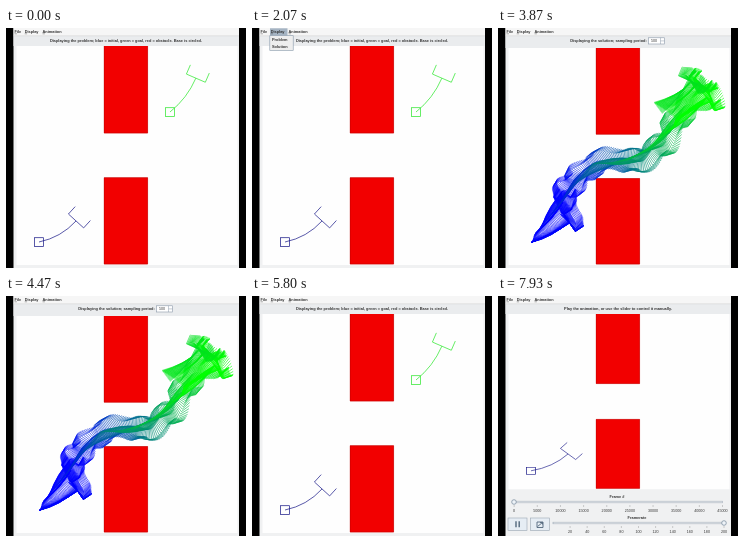
An HTML page that plays this animation: 240x240 px, repeating every 8000 ms.

```html
<!DOCTYPE html>
<html lang="en">
<head>
<meta charset="utf-8">
<title>Motion planner</title>
<style>
html, body { margin: 0; width: 100%; height: 100%; overflow: hidden; background: #000; }
svg { display: block; width: 100%; height: 100%; }
text { font: bold 3.9px "Liberation Sans", Arial, sans-serif; fill: #333; }
.mid { text-anchor: middle; }
.num { font-size: 3.7px; font-weight: normal; }
.robot { fill: none; stroke-width: .75; }
</style>
</head>
<body>
<svg viewBox="0 0 240 240">
  <rect width="240" height="240" fill="#000"/>
  <rect x="7.5" width="225.5" height="240" fill="#f0f1f2"/>
  <rect x="7.5" width="225.5" height="8" fill="#f6f6f6"/>
  <rect x="7.5" y="8" width="225.5" height="10" fill="#eaecee"/>
  <path d="M7.5 7.8H233" stroke="#ccc" stroke-width=".5"/>
  <g id="view"></g>
  <g id="menu"></g>
  <g id="bar"></g>
</svg>
<script>
const LOOP = 8000;
const $ = id => document.getElementById(id);
const rad = deg => deg * Math.PI / 180;
const n = v => v.toFixed(2);
const rect = (x, y, w, h, fill, stroke = 'none') =>
  `<rect x="${x}" y="${y}" width="${w}" height="${h}" fill="${fill}" stroke="${stroke}" stroke-width=".6"/>`;
const text = (x, y, s, cls = '') => `<text x="${x}" y="${y}" class="${cls}">${s}</text>`;
const line = (d, color, w = .6) => `<path d="${d}" fill="none" stroke="${color}" stroke-width="${w}"/>`;

// An arm that bends from its base, ending in a two-pronged gripper.
function arm([x, y, angle, bend]) {
  const at = (px, py, a, r) => [px + r * Math.cos(rad(a)), py + r * Math.sin(rad(a))];
  const head = at(x, y, angle, 42.6), dir = angle + bend / 2;
  const ctrl = at(x, y, angle - bend / 2, 21.3 / Math.cos(rad(bend / 2)));
  const left = at(...head, dir - 90, 10.3), right = at(...head, dir + 90, 10.3);
  const p = q => q.map(n).join(' ');
  return `M${n(x)} ${n(y)}Q${p(ctrl)} ${p(head)}` +
    `M${p(at(...left, dir, 10))}L${p(left)}L${p(right)}L${p(at(...right, dir, 10))}`;
}

const start = [33, 214, -29.6, -36], goal = [164, 84, -52.6, -28];
const route = [
  start, [34, 214, -26, -12], [35, 211, -42, -26], [37, 205, -52, -15], [44, 198, -58, 10],
  [53, 187, -54, 8], [66, 170, -52, 14], [79, 152, -29, 32], [94, 135, -3, 4],
  [112, 134, -13, -20], [130, 131, -29, -20], [147, 121, -44, -18], [163, 109, -50, -8],
  [176, 96, -38, 5], [177, 92, -32, 10], [178, 89, -54, -10], [168, 81, -40, -16],
  [156, 73, -24, -24], goal
];

const robot = (pose, color) => `<g class="robot" stroke="${color}">
  <path d="${arm(pose)}"/><rect x="${pose[0] - 4.4}" y="${pose[1] - 4.3}" width="8.8" height="8.8"/></g>`;

// Poses along the route; the arm sways on its way and comes to rest at both ends.
function sweep() {
  const perLeg = 16, legs = route.length - 1, total = perLeg * legs;
  let out = '';
  for (let i = 0; i <= total; i++) {
    const leg = Math.min(legs - 1, Math.floor(i / perLeg)), f = i / perLeg - leg;
    const [x, y, angle, bend] = route[leg].map((v, k) => v + (route[leg + 1][k] - v) * f);
    const sway = Math.sqrt(Math.max(0, Math.sin(Math.PI * i / total)));
    const pose = [x, y, angle + 4 * sway * Math.sin(i * .29), bend + 30 * sway * Math.sin(i * .21)];
    const g = Math.max(0, Math.min(1, (x + 42 * Math.cos(rad(angle)) - 68) / 140));
    out += line(arm(pose), `rgb(0,${Math.round(255 * g)},${Math.round(255 * (1 - g))})`, .6);
  }
  return out;
}

// The scene is laid out for a field from y = 18 to 237 and scaled to the room left.
const field = (top, scale, content) =>
  `<g transform="translate(0 ${top}) scale(1 ${scale}) translate(0 -18)">` +
  rect(10.5, 18, 221, 219, '#fefefe') + rect(98, 18, 43.8, 87.2, '#f20000') +
  rect(98, 149.5, 43.8, 86.7, '#f20000') +
  line('M98.2 18V105H141.6V18M98.2 236V149.7H141.6V236Z', '#b80000', .5) + content + '</g>';

function slider(x0, x1, y, value, first, step, count, gap) {
  let out = rect(x0, y - .8, x1 - x0, 1.6, '#fff', '#9aa6b3');
  for (let i = 0; i < count; i++) {
    const x = x1 - (count - 1 - i) * gap;
    out += line(`M${n(x)} ${y + 3}v2`, '#888', .4) + text(n(x), y + 9.6, first + i * step, 'mid num');
  }
  return out + `<circle cx="${value}" cy="${y}" r="2.3" fill="#eef3f8" stroke="#74879a" stroke-width=".7"/>`;
}

const views = {
  problem: field(18, 1, robot(start, '#22228c') + robot(goal, '#35e835')) +
    text(120, 13.8, 'Displaying the problem; blue = initial, green = goal, red = obstacle. Base is circled.', 'mid'),
  solution: rect(7.5, 18, 225.5, 2, '#eaecee') + field(20, .991, sweep()) +
    text(110.5, 14, 'Displaying the solution; sampling period:', 'mid') +
    rect(150.5, 9.8, 16, 6.2, '#fff', '#8a98a8') + text(153, 14.1, '500', 'num') +
    line('M162.5 9.8v6.2M162.5 12.9h4', '#8a98a8', .5),
  animation: field(18, .8, robot(start, '#22228c')) +
    text(120, 13.8, 'Play the animation, or use the slider to control it manually.', 'mid') +
    text(119, 202, 'Frame #', 'mid') + slider(16, 224.5, 206, 16, 0, 5000, 10, 23.15) +
    text(139, 222.6, 'Framerate', 'mid') + slider(55, 226, 227, 226, 20, 20, 10, 17.1) +
    rect(10, 222, 19, 12.5, '#e6edf4', '#9aa6b3') + rect(32.5, 222, 19, 12.5, '#e6edf4', '#9aa6b3') +
    line('M18 225.3v6M21.2 225.3v6', '#53687d', 1.4) +
    line('M39 226h6v5.5h-6zM39.5 230.5l5-4M42 226.5h2.5v2', '#53687d', .9)
};

const menus = {
  none: '',
  open: popup(false),
  hover: popup(true)
};

function popup(hover) {
  return rect(18, .3, 17.5, 7.3, '#a5b4c3') + rect(17.8, 7.7, 23.4, 14.8, '#eee', '#8799ab') +
    (hover ? rect(18.1, 8, 22.8, 6.9, '#a3b8cc') : '') +
    text(20, 12.8, 'Problem') + text(20, 19.7, 'Solution');
}

$('bar').innerHTML = [[8.5, 'File'], [18.7, 'Display'], [36.5, 'Animation']].map(([x, s]) =>
  text(x, 5, s) + line(`M${x} 5.8h2.4`, '#333', .4)).join('');

const steps = [
  [0, 'problem', 'none'], [1870, 'problem', 'open'], [2600, 'solution', 'none'],
  [4600, 'solution', 'open'], [4870, 'solution', 'hover'], [5270, 'problem', 'none'],
  [6530, 'animation', 'none']
];

$('view').innerHTML = Object.entries(views).map(([k, v]) => `<g id="${k}">${v}</g>`).join('');
$('menu').innerHTML = Object.entries(menus).map(([k, v]) => `<g id="${k}">${v}</g>`).join('');

function draw(now) {
  const t = now % LOOP;
  const [, view, menu] = steps.filter(s => s[0] <= t).pop();
  for (const k in views) $(k).style.display = k === view ? '' : 'none';
  for (const k in menus) $(k).style.display = k === menu ? '' : 'none';
}

const began = performance.now();
function tick() {
  draw(performance.now() - began);
  requestAnimationFrame(tick);
}
tick();
</script>
</body>
</html>
```
